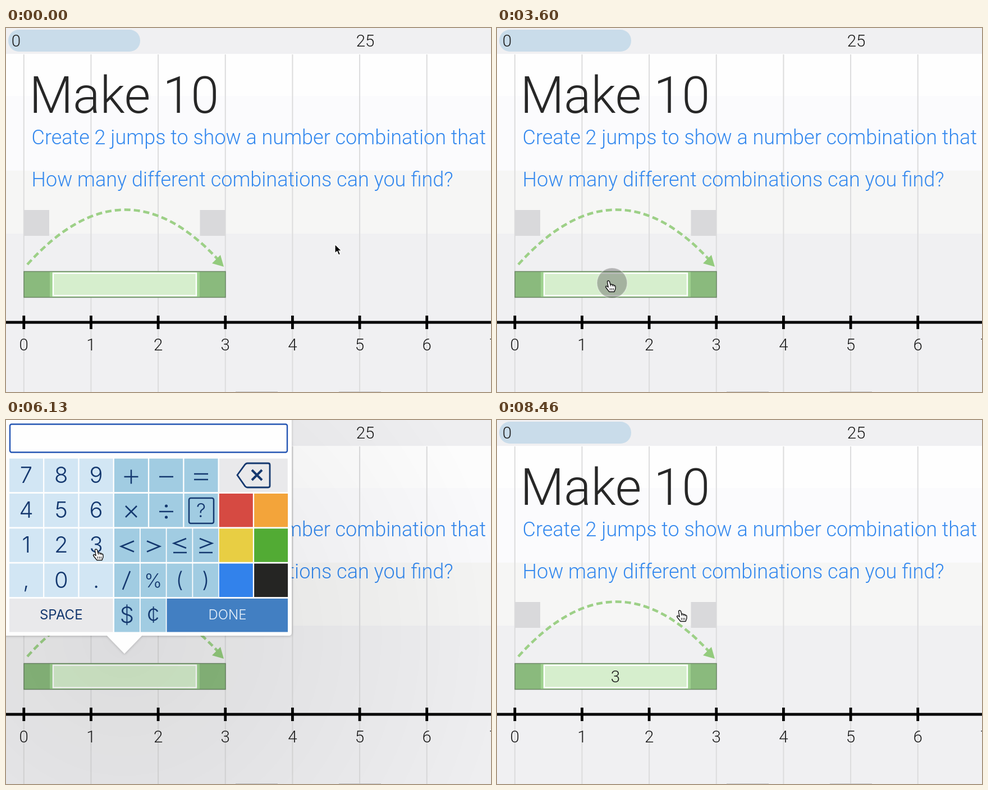
Recreate the animation shown at these times as an HTML page. Size 864x648 px, loop 9.33 s.

```html
<!DOCTYPE html>
<html lang="en">
<head>
<meta charset="utf-8">
<title>Make 10</title>
<style>
html, body { margin: 0; width: 100%; height: 100%; overflow: hidden; background: #f0f0f2; }
svg { display: block; width: 100vw; height: 100vh; }
text { font-family: Roboto, sans-serif; font-weight: 350; }
.label text, text.label { font-size: 29.5px; text-anchor: middle; fill: #1c1c1c; }
.prompt { font-size: 36px; font-weight: 300; fill: #3388ee; }
#popup text { font-family: Inter, "Liberation Sans", sans-serif; font-weight: 300; font-size: 40px; }
#keys text { text-anchor: middle; fill: #14386f; }
#keys .word { font-size: 24px; font-weight: 400; }
#keys .done { font-size: 24px; fill: #e6f0fa; }
#signs { fill: none; stroke: #14386f; stroke-width: 2.5; }

/* 140 ticks per loop; changes land on ticks */
.anim { animation: 9.33s step-end -8ms infinite; }
#shade, #popup { animation-name: open; }
#caret { animation-name: blink; }
#value, #barValue { animation-name: typed; }
#press { animation-name: press; }
#cursor { animation-name: travel; }
#arrow { animation-name: arrow; }
#hand { animation-name: hand; }
#tap1 { animation-name: tap1; }
#tap2 { animation-name: tap2; }
#tap3 { animation-name: tap3; }

@keyframes open {
  0%, 84.286%, 100% { opacity: 0 }
  40% { opacity: .4 }
  40.714% { opacity: .8 }
  41.429% { opacity: 1 }
}
@keyframes blink {
  0%, 50%, 60.714% { opacity: 1; transform: none }
  44.286%, 55%, 65.714% { opacity: 0; transform: none }
  70%, 80.714% { opacity: 1; transform: translateX(20.5px) }
  75% { opacity: 0; transform: translateX(20.5px) }
  100% { opacity: 1; transform: translateX(20.5px) }
}
@keyframes typed { 0% { opacity: 0 } 70%, 100% { opacity: 1 } }
@keyframes press { 0% { opacity: 0 } 81.429%, 100% { opacity: 1 } }
@keyframes arrow { 0% { opacity: 1 } 31.429%, 100% { opacity: 0 } }
@keyframes hand { 0% { opacity: 0 } 31.429%, 100% { opacity: 1 } }
@keyframes travel {
  0% { transform: translate(586px, 385px) }
  24.286% { transform: translate(568px, 388px); animation-timing-function: steps(6) }
  28.571% { transform: translate(340px, 421px); animation-timing-function: steps(4) }
  31.429% { transform: translate(228px, 441px); animation-timing-function: steps(3) }
  33.571% { transform: translate(199px, 450px) }
  57.857% { transform: translate(199px, 450px); animation-timing-function: steps(3) }
  60% { transform: translate(192px, 412px); animation-timing-function: steps(5) }
  63.571% { transform: translate(168px, 262px); animation-timing-function: steps(3) }
  65.714% { transform: translate(161px, 230px) }
  70% { transform: translate(161px, 230px); animation-timing-function: steps(6) }
  74.286% { transform: translate(229px, 275px); animation-timing-function: steps(5) }
  77.857% { transform: translate(299px, 322px); animation-timing-function: steps(3) }
  80%, 100% { transform: translate(326px, 339px) }
}
@keyframes tap1 {
  0%, 46.429%, 100% { opacity: 0 }
  34.286% { opacity: .5 }
  35% { opacity: 1 }
  44.286% { opacity: .75 }
  45% { opacity: .5 }
  45.714% { opacity: .25 }
}
@keyframes tap2 {
  0%, 72.143%, 100% { opacity: 0 }
  67.857% { opacity: .5 }
  68.571% { opacity: 1 }
  70.714% { opacity: .6 }
  71.429% { opacity: .3 }
}
@keyframes tap3 {
  0%, 90.714%, 100% { opacity: 0 }
  80.714% { opacity: .5 }
  81.429% { opacity: 1 }
  89.286% { opacity: .6 }
  90% { opacity: .3 }
}
</style>
</head>
<body>
<svg viewBox="0 0 864 648">
  <defs>
    <radialGradient id="dim" gradientUnits="userSpaceOnUse" cx="211" cy="384" r="700">
      <stop offset="0" stop-opacity=".085"/>
      <stop offset="1" stop-opacity=".006"/>
    </radialGradient>
    <filter id="soft" x="-10%" y="-10%" width="120%" height="120%">
      <feDropShadow dx="0" dy="1" stdDeviation="2" flood-opacity=".22"/>
    </filter>
  </defs>

  <rect width="864" height="648" fill="#f0f0f2"/>
  <rect y="46" width="864" height="76" fill="#fefefe"/>
  <rect y="121" width="864" height="134" fill="#fbfbfd"/>
  <rect y="254" width="864" height="112" fill="#f6f6f5"/>
  <rect x="4" y="3" width="235" height="39" rx="19" fill="#c9dcea"/>
  <g id="grid" fill="#dcdcdd"></g>
  <text class="label" x="18" y="32.500">0</text>
  <text class="label" x="640" y="32.500">25</text>

  <text x="41.500" y="151" font-size="90" style="font-weight:300" fill="#272727">Make 10</text>
  <text class="prompt" x="45.500" y="207">Create 2 jumps to show a number combination that adds to 10.</text>
  <text class="prompt" x="45.500" y="281.500">How many different combinations can you find?</text>

  <path d="M32 324h45v46h-45zM345.500 324h45v46h-45z" fill="#d9d9db"/>
  <path d="M38 421Q212 228 382 417" fill="none" stroke="#9dd087" stroke-width="4.600" stroke-dasharray="11 6"/>
  <path d="M388 425L367 419L382 404Z" fill="#93cb7d"/>

  <rect x="32" y="433.500" width="359" height="46" fill="#8aba7d"/>
  <rect x="78" y="434" width="267" height="45" fill="#9fd290"/>
  <rect x="84" y="436.500" width="255" height="40" fill="#d6eecd" stroke="#fff" stroke-width="2.500"/>
  <rect x="32" y="433.500" width="359" height="46" fill="none" stroke="#6b8764" stroke-width="1.500"/>
  <path d="M409 647h75v1h-75zM593 647h75v1h-75z" fill="#c6c6c8"/>

  <rect id="shade" class="anim" width="864" height="648" fill="url(#dim)"/>
  <text id="barValue" class="label anim" x="211" y="467">3</text>

  <rect y="521.500" width="864" height="5"/>
  <g id="ticks"></g>
  <g id="numbers" class="label"></g>

  <g id="popup" class="anim">
    <path d="M-8 -8H503Q509 -8 509 -2V378Q509 384 503 384H242L211 416L180 384H-8Z" fill="#fefefe" filter="url(#soft)"/>
    <rect x="7" y="7.500" width="494" height="50" rx="3" fill="#fefefe" stroke="#2455b3" stroke-width="2.400"/>
    <text id="value" class="anim" x="11" y="46" fill="#111">3</text>
    <rect id="caret" class="anim" x="13" y="9" width="1.500" height="46"/>
    <g id="keys"></g>
    <g id="signs">
      <path d="M210.500 101h25M223 88.500v25M273 101h25M335 96h25M335 106h25"/>
      <path d="M213 153l20 20M233 153l-20 20M273 163h25"/>
      <path d="M228 215.500L205 225L228 234.500M251 215.500L274 225L251 234.500"/>
      <path d="M321 211L299 219.500L321 228M298 236h24M345 211L367 219.500L345 228M344 236h24"/>
      <path d="M208 302L221 269"/>
      <rect x="326" y="139" width="44" height="45" rx="3"/>
      <path d="M412 98L426 79Q428 77 430 77H467Q470 77 470 80V117Q470 120 467 120H430Q428 120 426 118Z" stroke-width="2.800"/>
      <path d="M438 89l18 18M456 89l-18 18" stroke-width="4"/>
      <g fill="#14386f" stroke="none"><circle cx="285.500" cy="153" r="2.600"/><circle cx="285.500" cy="173" r="2.600"/></g>
    </g>
  </g>

  <g stroke="#fff" stroke-opacity=".3" stroke-width="2">
    <circle id="tap1" class="anim" cx="205" cy="454" r="27" fill="#5f5f5f" fill-opacity=".42"/>
    <circle id="tap2" class="anim" cx="167" cy="236" r="27" fill="#777" fill-opacity=".35"/>
    <circle id="tap3" class="anim" cx="334" cy="351" r="29" fill="#cdcdcd" fill-opacity=".42"/>
  </g>

  <g id="cursor" class="anim">
    <path id="arrow" class="anim" d="M0 0V16L3.800 12.600L6.500 19L9.500 17.700L6.800 11.500H11.500Z" stroke="#fff" stroke-width="1.200"/>
    <g id="hand" class="anim" fill="#fff" stroke="#111" stroke-width="1.400" stroke-linejoin="round">
      <path d="M-2.500 2Q-2.500 0 -.5 0Q1.200 0 1.700 2L3 7Q5 5.500 6.500 7.500Q8.500 6.500 9.500 8.500Q12 8 12 10.500V14L10 19.500H1L-3.500 14L-5.500 11Q-5 8.500 -2.500 10L-.8 11.500Z"/>
      <path d="M3 7l.8 3M6.500 7.500l.6 2.800M9.500 8.500l.2 2M2.500 13v4M5.500 13v4M8.300 13v4" fill="none" stroke-width="1"/>
    </g>
  </g>
</svg>
<script>
const byId = id => document.getElementById(id);
const fill = (id, parts) => { byId(id).innerHTML = parts.join(''); };

const units = [...Array(8).keys()];
const unitX = n => 31.8 + 119.65 * n;
fill('grid', units.map(n => `<rect x="${unitX(n) - 1}" y="47" width="2" height="601"/>`));
fill('ticks', units.map(n => `<rect x="${unitX(n) - 2.4}" y="512" width="4.800" height="24"/>`));
fill('numbers', units.map(n => `<text x="${unitX(n)}" y="574">${n}</text>`));

const PITCH = 62.3;
const LIGHT = '#d2e6f4', MID = '#a1cce2', GREY = '#e9e9eb';
const keys = [];
const rowY = row => 68.7 + PITCH * row;

function key(x, row, w, color, text = '', attrs = '', drop = 43) {
  const y = rowY(row);
  keys.push(`<rect x="${x}" y="${y}" width="${w}" height="59.500" fill="${color}"/>`);
  if (text) keys.push(`<text x="${x + w / 2}" y="${y + drop}" ${attrs}>${text}</text>`);
}
const colX = col => 6 + PITCH * col;
const halfX = col => 193 + 46.75 * col;

['789', '456', '123', ',0.'].forEach((line, row) =>
  [...line].forEach((c, col) => key(colX(col), row, 60, LIGHT, c)));
for (const row of [0, 1])
  for (const col of [3, 4, 5])
    key(colX(col), row, 60, MID, row && col === 5 ? '?' : '', 'style="font-size:34px"', 42);
for (let col = 0; col < 4; col++) {
  key(halfX(col), 2, 45, MID);
  key(halfX(col), 3, 45, MID, ['', '%', '(', ')'][col], `style="font-size:${col === 1 ? 34 : 38}px"`, 42);
}
key(colX(6), 0, 122, GREY);
[['#d64a42', '#f3a43a'], ['#e8ce43', '#52ab34'], ['#3282eb', '#252523']].forEach((pair, i) =>
  pair.forEach((color, j) => key(colX(6 + j), i + 1, 60, color)));
key(6, 4, 184.5, GREY, 'SPACE', 'class="word"', 37);
key(halfX(0), 4, 45, MID, '$');
key(halfX(1), 4, 45, MID, '¢');
key(halfX(2), 4, 215.5, '#427fc2');
keys.push('<g id="press" class="anim">');
key(halfX(2), 4, 215.5, '#90bcdb');
keys.push(`</g><text class="done" x="394.500" y="${rowY(4) + 37}">DONE</text>`);
fill('keys', keys);
</script>
</body>
</html>
```
